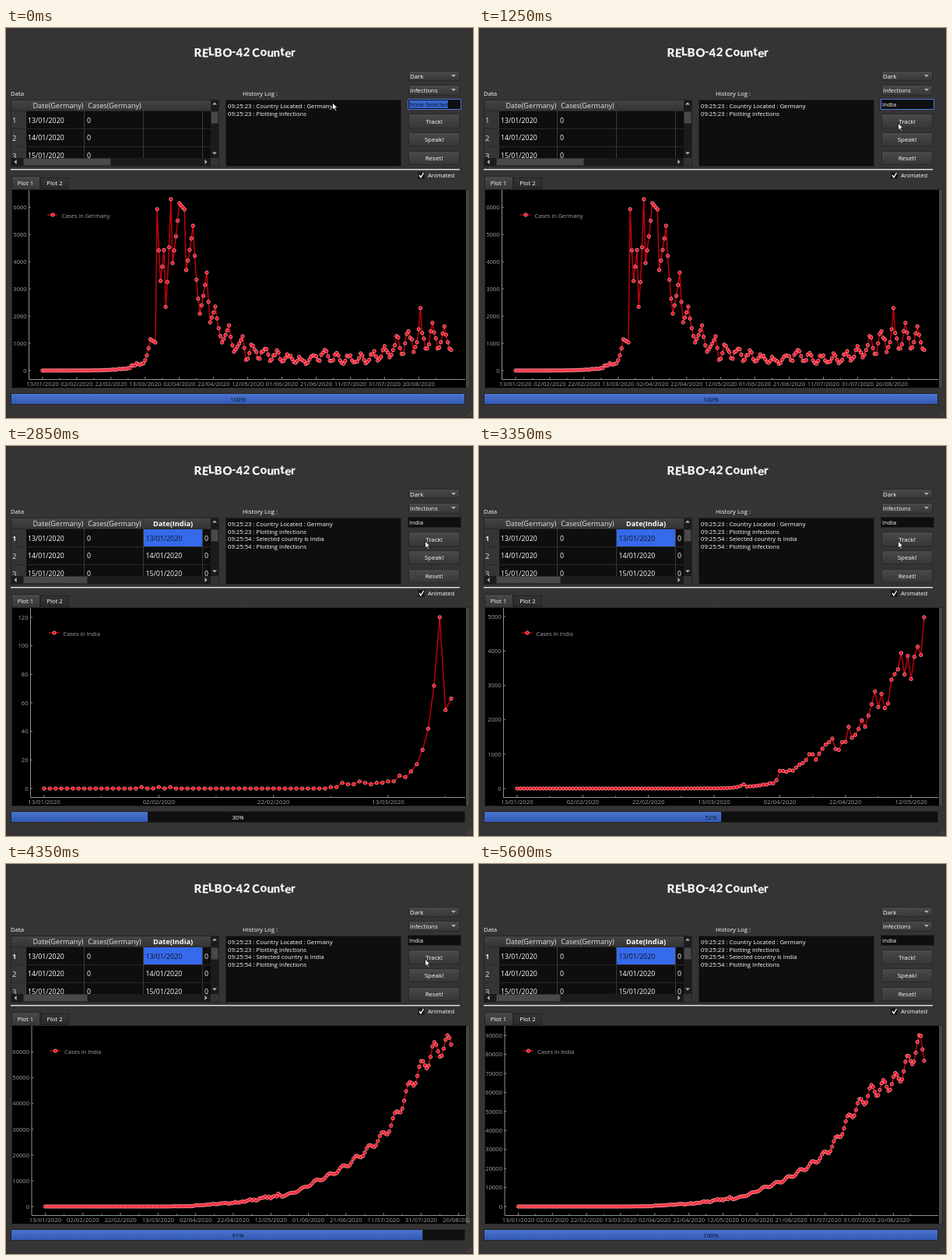
Animation of 600x501 px, one loop 5.65 s. Source, as an HTML page with a canvas:

```html
<!DOCTYPE html>
<html lang="en">
<head>
<meta charset="utf-8">
<title>Case counter</title>
<style>
html, body { margin: 0; width: 100%; height: 100%; overflow: hidden; background: #353334; }
canvas { display: block; }
</style>
</head>
<body>
<canvas id="stage" width="600" height="501"></canvas>
<script>
const ctx = document.getElementById('stage').getContext('2d');
const LOOP = 5650, STEP = 50, FONT = '"Open Sans", "Noto Sans", sans-serif';

// ---- drawing helpers ----
function rect(x, y, w, h, fill, stroke) {
  if (fill) { ctx.fillStyle = fill; ctx.fillRect(x, y, w, h); }
  if (stroke) {
    ctx.strokeStyle = stroke; ctx.lineWidth = 1;
    ctx.strokeRect(x + .5, y + .5, w - 1, h - 1);
  }
}
function line(points, color, width = 1) {
  ctx.beginPath();
  points.forEach(([x, y]) => ctx.lineTo(x, y));
  ctx.strokeStyle = color; ctx.lineWidth = width; ctx.lineJoin = 'round';
  ctx.stroke();
}
function shape(points, fill, stroke) {
  ctx.beginPath();
  points.forEach(([x, y]) => ctx.lineTo(x, y));
  ctx.closePath();
  ctx.fillStyle = fill; ctx.fill();
  if (stroke) { ctx.strokeStyle = stroke; ctx.lineWidth = .8; ctx.stroke(); }
}
function text(s, x, y, size = 7.8, color = '#ffffff', align = 'left', weight = 400) {
  ctx.font = `${weight} ${size}px ${FONT}`;
  ctx.fillStyle = color; ctx.textAlign = align;
  ctx.fillText(s, x, y);
}
function shade(y, h, top, bottom) {
  const g = ctx.createLinearGradient(0, y, 0, y + h);
  g.addColorStop(0, top); g.addColorStop(1, bottom);
  return g;
}
function arrow(x, y, dx, dy) {
  const w = 3, h = 1.6;
  shape([[x + dx * h, y + dy * h], [x - dx * h + dy * w, y - dy * h + dx * w],
         [x - dx * h - dy * w, y - dy * h - dx * w]], '#b4b4b4');
}
function clipped(x, y, w, h, paint) {
  ctx.save();
  ctx.beginPath(); ctx.rect(x, y, w, h); ctx.clip();
  paint();
  ctx.restore();
}
// Linear interpolation through [position, value] pairs
function lerp(pairs, p) {
  const k = pairs.findIndex(q => q[0] >= p);
  if (k < 0) return pairs[pairs.length - 1][1];
  if (k === 0) return pairs[0][1];
  const [a, u] = pairs[k - 1], [b, v] = pairs[k];
  return u + (v - u) * (p - a) / (b - a);
}

// ---- daily cases, day 0 = 13 January 2020 ----
const noise = d => {
  const s = Math.sin(d * 12.9898) * 43758.5453;
  return (s - Math.floor(s)) * 2 - 1;
};
// Exponential trend with a weekly swing and random roughness
function cases(days, trend, swing, rough) {
  const logs = trend.map(([d, v]) => [d, Math.log(v)]);
  return Array.from({ length: days }, (_, d) => {
    const week = Math.cos((d - .5) * 2 * Math.PI / 7);
    return Math.round(Math.exp(lerp(logs, d)) *
      (1 - lerp(swing, d) * week) * (1 + lerp(rough, d) * noise(d)));
  });
}
const germany = cases(240,
  [[0, .1], [30, 5], [54, 200], [59, 290], [63, 1150], [66, 1030], [67, 5930], [69, 3290],
   [71, 4430], [72, 2340], [75, 6294], [76, 3950], [80, 6150], [83, 5920], [84, 3690],
   [88, 5320], [92, 2090], [96, 3600], [98, 1770], [101, 2350], [105, 1030], [109, 1660],
   [112, 690], [117, 1260], [119, 550], [122, 750], [140, 480], [154, 340], [163, 620],
   [175, 390], [189, 430], [210, 950], [220, 1200], [221, 1700], [222, 1200], [239, 1150]],
  [[118, 0], [119, .32], [239, .36]],
  [[54, .4], [62, 0], [119, 0], [126, .14]]);
const india = cases(239,
  [[0, .1], [49, .3], [50, 2], [62, 8], [66, 26], [69, 120], [70, 56], [78, 170], [80, 470],
   [92, 1050], [104, 1750], [114, 3200], [123, 3800], [124, 4820], [126, 4000], [143, 9500],
   [165, 18500], [182, 29500], [195, 48500], [206, 60000], [215, 63200], [222, 66800],
   [229, 76200], [236, 86500], [238, 81000]],
  [[0, 0], [60, 0], [90, .05], [239, .06]],
  [[50, .9], [66, .1], [69, 0], [75, .15], [120, .15], [124, 0]]);
for (const d of [17, 20, 22]) india[d] = 1;

// ---- window parts ----
function drawTitle() {
  const title = 'RELBO-42 Counter';
  ctx.font = '900 15px Lato, sans-serif';
  ctx.fillStyle = '#f2f2f2'; ctx.textAlign = 'left';
  let x = 306.5 - ctx.measureText(title).width / 2;
  [...title].forEach((c, i) => {
    ctx.save();
    ctx.translate(x, 36.5 + Math.sin(i * 2.3));
    ctx.rotate(Math.sin(i * 1.9) * .07);
    ctx.fillText(c, 0, 0);
    ctx.restore();
    x += ctx.measureText(c).width;
  });
}

function button(y, h, label, isCombo) {
  rect(517, y, 66, h, shade(y, h, '#4c4a4b', '#373536'), '#2a2829');
  if (isCombo) {
    text(label, 519, y + 9.7);
    arrow(575, y + 6.5, 0, 1);
  } else text(label, 550, y + h / 2 + 3, 8, '#ffffff', 'center');
}

function drawField(t, tracked) {
  rect(516, 91, 69, 14, '#0f0e0f', tracked ? '#232122' : '#4d78d6');
  const typed = Math.max(0, Math.min(5, Math.floor((t - 200) / 100)));
  if (typed) text('India'.slice(0, typed), 518, 101);
  else {
    rect(518, 93, 50, 10, '#3565cf');
    text('None Selected', 518, 101, 7.5, '#101426');
  }
}

function drawTable(tracked) {
  rect(6, 92, 268, 86, '#0f0e0f', '#252324');
  rect(7, 93, 256, 13, shade(93, 13, '#454344', '#363435'));
  rect(7, 107, 18, 60, '#363435');
  for (const y of [106, 129, 152]) rect(7, y, 256, 1, '#292728');
  for (const x of [25, 100, 176, 252]) rect(x, 93, 1, 74, '#3a3839');
  text('Date(Germany)', 67, 103, 9.2, '#e4e4e4', 'center');
  text('Cases(Germany)', 139.5, 103, 9, '#e4e4e4', 'center');
  if (tracked) {
    text('Date(India)', 214.5, 103, 9.2, '#ffffff', 'center', 700);
    rect(177, 107, 75, 22, '#356aea');
  }
  clipped(7, 93, 256, 74, () => {
    for (let i = 0; i < 3; i++) {
      const y = 121.5 + i * 22.8, date = `${13 + i}/01/2020`;
      text(i + 1, 8, y + .5, 9.5, '#e4e4e4', 'left', tracked && !i ? 700 : 400);
      text(date, 28, y, 8.8);
      text('0', 104, y, 8.8);
      if (tracked) {
        text(date, 179.5, y, 8.8, i ? '#ffffff' : '#101426');
        text('0', 255, y, 8.8);
      }
    }
  });
  // scroll bars
  rect(263, 93, 10, 74, '#1c1a1b');
  rect(263, 107, 10, 16, '#4a4849', '#302e2f');
  arrow(268, 97, 0, -1); arrow(268, 161, 0, 1);
  rect(7, 167, 256, 10, '#1c1a1b');
  rect(22, 167, tracked ? 83 : 113, 10, '#4a4849', '#302e2f');
  arrow(12, 172, -1, 0); arrow(257, 172, 1, 0);
  rect(263, 167, 10, 10, '#353334');
}

function drawLog(tracked) {
  rect(282, 92, 226, 86, '#0f0e0f', '#252324');
  const lines = ['09:25:23 : Country Located : Germany', '09:25:23 : Plotting infections'];
  if (tracked) lines.push('09:25:54 : Selected country is India', '09:25:54 : Plotting Infections');
  lines.forEach((s, i) => text(s, 285, 103 + i * 9.7, 7.7));
}

function drawFrame() {
  rect(0, 0, 600, 501, '#353334');
  drawTitle();
  text('Data', 6, 87);
  text('History Log :', 304, 87);
  button(55, 13, 'Dark', true);
  button(73, 14, 'Infections', true);
  button(110, 19, 'Track!');
  button(134, 18, 'Speak!');
  button(158, 18, 'Reset!');
  rect(6, 181, 577, 1.5, '#dcdcdc');
  rect(529, 185, 9, 9, '#141314', '#222021');
  line([[531, 189], [533, 192], [536.5, 186]], '#ffffff', 1.4);
  text('Animated', 542, 192, 7.6);
  rect(7, 207, 589, 256, '#454344', '#2a2829');
  rect(7, 190, 37, 18, shade(190, 18, '#4a4849', '#383637'), '#262425');
  rect(44, 192, 37, 15, shade(192, 15, '#353334', '#2a2829'), '#232122');
  text('Plot 1', 25, 201.5, 7.8, '#ffffff', 'center');
  text('Plot 2', 62.5, 202, 7.8, '#ffffff', 'center');
  for (let i = 0; i < 3; i++) line([[598, 493 + i * 2.5], [592 + i * 2.5, 499]], '#5a5859', .7);
}

// ---- plot ----
function dot(x, y) {
  ctx.beginPath(); ctx.arc(x, y, 2.2, 0, 7);
  ctx.fillStyle = '#ee0018'; ctx.fill();
  ctx.strokeStyle = '#ffb0b6'; ctx.lineWidth = .75; ctx.stroke();
}

function drawPlot(data, count, country, axis) {
  const gray = '#a2a2a2', red = '#c8000e', values = data.slice(0, count);
  const left = axis + 18, last = Math.max(1, count - 1);
  const top = Math.max(...values), flat = top === 0;
  const px = d => left + (572 - left) * d / last;
  const py = v => flat ? 330 - v * 243 / 7000 : 440 - v * 220 / top;
  const span = flat ? 7000 : top * 243 / 220;

  clipped(8, 208, 588, 254, () => {
    rect(8, 208, 583, 254, '#000');
    line([[axis + .5, 208], [axis + .5, 451.5], [590, 451.5]], gray, .9);

    const ideal = span / Math.log(243), unit = 10 ** Math.floor(Math.log10(ideal));
    const step = ideal >= 2 * unit ? 2 * unit : unit;
    for (let k = flat ? -3 : 0; py(k * step) > 209; k++) {
      const y = py(k * step), label = (k * step).toFixed(step < 1 ? 1 : 0);
      line([[axis, y], [axis + 3, y]], gray, .8);
      text(label, axis - 2.5, y + 2.8, 7.6, gray, 'right');
    }
    for (let d = 0; d < data.length && px(d) < 590; d += 10) {
      const x = px(d), major = d % 20 === 0;
      line([[x, 451], [x, major ? 448 : 449.5]], gray, .8);
      if (!major) continue;
      const date = new Date(Date.UTC(2020, 0, 13 + d)).toISOString().slice(0, 10);
      text(date.split('-').reverse().join('/'), x, 459.5, 7.8, gray, 'center');
    }

    const points = values.map((v, d) => [px(d), py(v)]);
    line(points, red, 1.4);
    points.forEach(p => dot(...p));
    line([[axis + 24, 240], [axis + 37, 240]], red, 1.4);
    dot(axis + 31, 240);
    text('Cases in ' + country, axis + 42.5, 243.5, 7.4, gray);
  });
}

function drawProgress(share) {
  const label = Math.round(share * 100) + '%', w = 582 * share;
  rect(6, 469, 584, 15, '#100f10', '#242223');
  text(label, 298, 480, 7.7, '#ffffff', 'center');
  clipped(7, 470, w, 13, () => {
    rect(7, 470, w, 13, shade(470, 13, '#4a74cf', '#3259b4'));
    text(label, 298, 480, 7.7, '#0c1020', 'center');
  });
}

function drawPointer(t) {
  if (t >= 5400) return;
  let p = Math.max(0, Math.min(1, (t - 750) / 450));
  p = p * p * (3 - 2 * p);
  const x = 419.5 + 119 * p, y = 96 + 26 * p;
  shape([[0, 0], [0, 9], [2, 7.2], [3.6, 10.6], [5, 10], [3.5, 6.7], [6.3, 6.5]]
    .map(([a, b]) => [x + a, y + b]), '#ffffff', '#111111');
}

// Number of days plotted over time
const plotted = [[2250, 1], [2300, 3], [2850, 72], [3350, 125], [4350, 217], [4600, 239]];

function draw(now) {
  const t = Math.floor(now % LOOP / STEP) * STEP;
  const tracked = t >= 2200, plotting = t >= 2250;
  drawFrame();
  drawField(t, tracked);
  drawTable(tracked);
  drawLog(tracked);
  if (plotting) {
    const n = Math.round(lerp(plotted, t));
    drawPlot(india, n, 'India', n > 143 ? 32.5 : 31);
    drawProgress(n / india.length);
  } else {
    drawPlot(germany, germany.length, 'Germany', 29);
    drawProgress(1);
  }
  drawPointer(t);
}

const start = performance.now();
function tick() {
  draw(performance.now() - start);
  requestAnimationFrame(tick);
}
tick();
</script>
</body>
</html>
```
